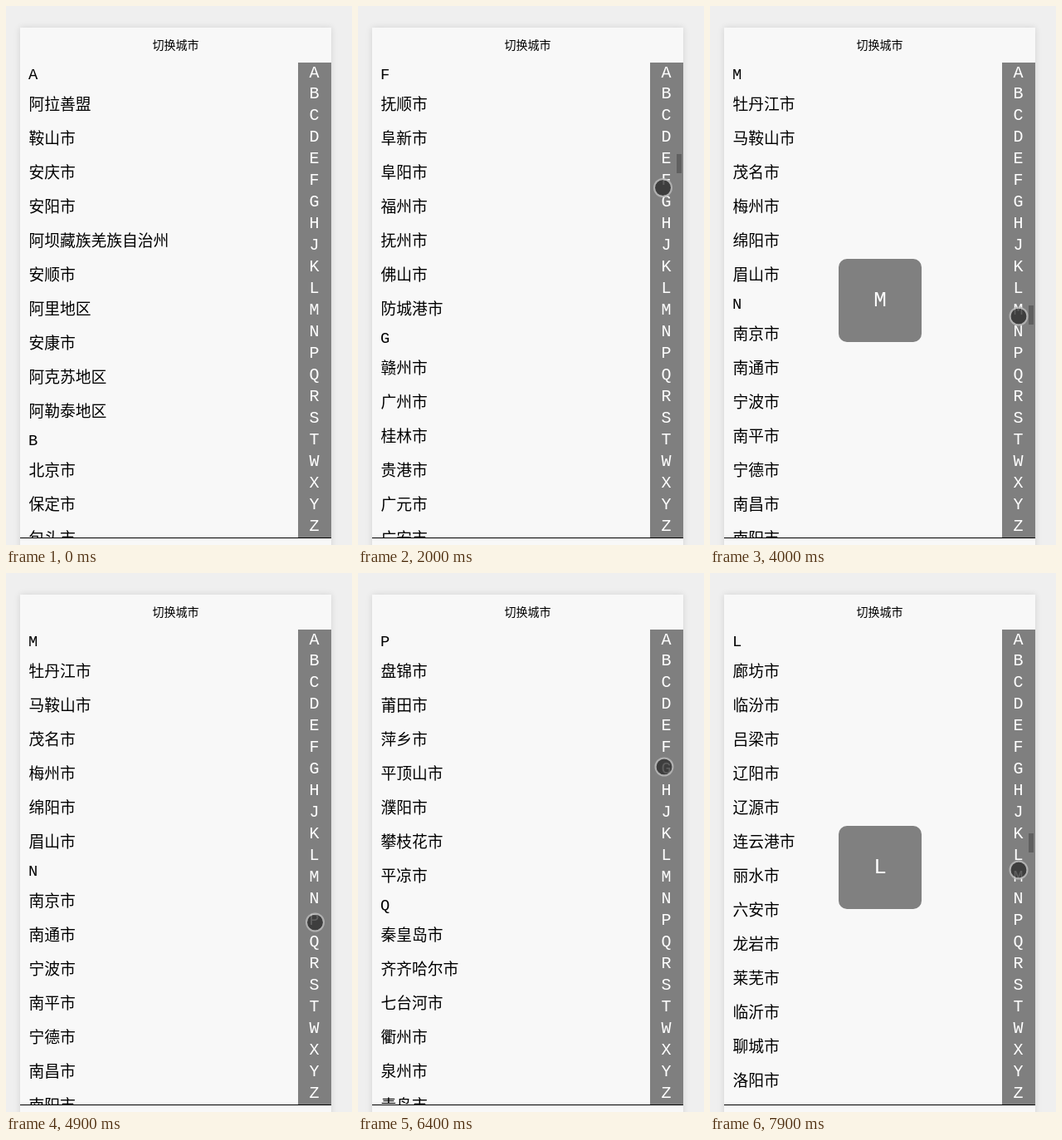
An HTML page for the animation above (8 s loop, 417 by 648 pixels).

```html
<!DOCTYPE html>
<html lang="zh-CN">
<head>
<meta charset="utf-8">
<title>切换城市</title>
<style>
html, body { margin: 0; width: 100%; height: 100%; overflow: hidden; }
body { position: relative; background: #efefef; color: #000; font-family: "Noto Sans CJK SC", "Noto Sans CJK", sans-serif; }
div { box-sizing: border-box; }
.card, .title, .list, .line, .index, .popup, .bar, .cursor { position: absolute; }
.card { left: 17px; top: 26px; width: 375px; height: 640px; background: #f8f8f8; box-shadow: 0 0 8px rgba(0,0,0,.12); }
.title { left: 17px; top: 26px; width: 375px; line-height: 41px; text-align: center; font-size: 14px; }
.list { left: 17px; top: 67px; width: 335px; height: 572px; overflow: hidden; font-size: 18.75px; white-space: nowrap; }
.rows { padding: .5px 0 0 10px; font-family: "Noto Sans CJK SC Light", "Noto Sans CJK SC DemiLight", "Noto Sans CJK SC", "Noto Sans CJK", sans-serif; font-weight: 300; }
.rows h2, .index, .popup { font-family: "Liberation Mono", monospace; font-weight: 400; }
.rows h2 { margin: 0; height: 30px; line-height: 30px; font-size: 18.75px; }
.rows p { position: relative; top: -2px; left: .5px; margin: 0; height: 41px; line-height: 41px; }
.line { left: 17px; top: 639px; width: 375px; height: 1px; background: #000; }
.index { left: 352px; top: 68px; width: 40px; height: 571px; background: #7f7f7f; color: #fff; font-size: 20px; text-align: center; display: flex; flex-direction: column; }
.index span { position: relative; top: -.5px; left: -.5px; flex: 1 0 0; line-height: 25.95px; }
.popup { left: 155px; top: 304px; width: 100px; height: 100px; border-radius: 10px; background: #808080; color: #fff; font-size: 26px; line-height: 101px; text-align: center; }
.bar { left: 384px; width: 6px; height: 23px; background: #606060; }
.cursor { left: -11.5px; top: -11.5px; width: 23px; height: 23px; border-radius: 50%; background: rgba(40,40,40,.74); border: 2px solid rgba(185,185,185,.85); background-clip: padding-box; }
</style>
</head>
<body>
<div class="card"></div>
<div class="title">切换城市</div>
<div class="list"><div class="rows"></div></div>
<div class="line"></div>
<div class="index"></div>
<div class="popup"></div>
<div class="bar"></div>
<div class="cursor"></div>
<script>
const LOOP = 8000, TICK = 100;
const POPUP_LIFE = 900, BAR_LIFE = 600;

const cities = {
  A: '阿拉善盟 鞍山市 安庆市 安阳市 阿坝藏族羌族自治州 安顺市 阿里地区 安康市 阿克苏地区 阿勒泰地区',
  B: '北京市 保定市 包头市 巴彦淖尔市',
  D: '大同市 大连市 丹东市 大庆市 大兴安岭地区 东营市 德州市 东莞市 德阳市 达州市 大理白族自治州 德宏傣族景颇族自治州 迪庆藏族自治州',
  F: '抚顺市 阜新市 阜阳市 福州市 抚州市 佛山市 防城港市',
  G: '赣州市 广州市 桂林市 贵港市 广元市 广安市 甘孜藏族自治州 贵阳市 甘南藏族自治州 果洛藏族自治州 固原市',
  H: '邯郸市 衡水市 呼和浩特市',
  J: '晋城市 晋中市 锦州市 吉林市 鸡西市 佳木斯市 嘉兴市 金华市 景德镇市 九江市 吉安市 济南市 济宁市 焦作市',
  K: '开封市 昆明市 克拉玛依市 克孜勒苏柯尔克孜自治州 喀什地区',
  L: '廊坊市 临汾市 吕梁市 辽阳市 辽源市 连云港市 丽水市 六安市 龙岩市 莱芜市 临沂市 聊城市 洛阳市',
  M: '牡丹江市 马鞍山市 茂名市 梅州市 绵阳市 眉山市',
  N: '南京市 南通市 宁波市 南平市 宁德市 南昌市 南阳市',
  P: '盘锦市 莆田市 萍乡市 平顶山市 濮阳市 攀枝花市 平凉市',
  Q: '秦皇岛市 齐齐哈尔市 七台河市 衢州市 泉州市 青岛市 曲靖市'
};

const taps = [
  { at: 1100, letter: 'D', bar: 147 },
  { at: 2000, letter: 'F', bar: 178 },
  { at: 2900, letter: 'K', bar: 304 },
  { at: 4000, letter: 'M', bar: 360 },
  { at: 5200, letter: 'P', bar: 392 },
  { at: 6600, letter: 'G', bar: 190 },
  { at: 7100, letter: 'J', bar: 256 },
  { at: 7600, letter: 'L', bar: 313 }
];

// each move: start, end, x, y reached; the pointer rests in between
const moves = [
  [0, 300, 378, 180], [400, 900, 373, 161], [1300, 1700, 367, 218],
  [2000, 2600, 372, 312], [2900, 3400, 371.5, 372.5], [4000, 4900, 372, 419.5],
  [5300, 5600, 390.5, 237.5], [5600, 5800, 380, 198], [5800, 6200, 368, 255],
  [6200, 6400, 368.5, 232.5], [6600, 7000, 371, 285], [7100, 7900, 371.5, 356.5]
];

const $ = s => document.querySelector(s);
const rows = $('.rows'), popup = $('.popup'), bar = $('.bar'), cursor = $('.cursor');

const offsets = {};
let height = 0;
rows.innerHTML = Object.entries(cities).map(([letter, names]) => {
  const items = names.split(' ');
  offsets[letter] = height;
  height += 30 + 41 * items.length;
  return `<h2>${letter}</h2>` + items.map(n => `<p>${n}</p>`).join('');
}).join('');
$('.index').innerHTML = [...'ABCDEFGHJKLMNPQRSTWXYZ'].map(c => `<span>${c}</span>`).join('');

function pointer(t) {
  let x = 440, y = 90;
  for (const [from, to, tx, ty] of moves) {
    const k = Math.min(1, Math.max(0, (t - from) / (to - from)));
    x += (tx - x) * k;
    y += (ty - y) * k;
  }
  return [x, y];
}

const show = (el, on) => { el.style.visibility = on ? 'visible' : 'hidden'; };

function draw(t) {
  const tap = taps.findLast(p => p.at <= t);
  const letter = tap ? tap.letter : 'A';
  // any earlier tap's timer also closes a newer popup
  const closed = tap && taps.some(p => p.at + POPUP_LIFE >= tap.at && p.at + POPUP_LIFE <= t);
  rows.style.transform = `translateY(${-offsets[letter]}px)`;
  popup.textContent = letter;
  show(popup, tap && !closed);
  show(bar, tap && t < tap.at + BAR_LIFE);
  if (tap) bar.style.top = tap.bar + 'px';
  const [x, y] = pointer(t);
  cursor.style.transform = `translate(${x}px, ${y}px)`;
}

const start = performance.now();
function loop() {
  const t = (performance.now() - start) % LOOP;
  draw(Math.floor(t / TICK) * TICK);
  requestAnimationFrame(loop);
}
loop();
</script>
</body>
</html>
```
